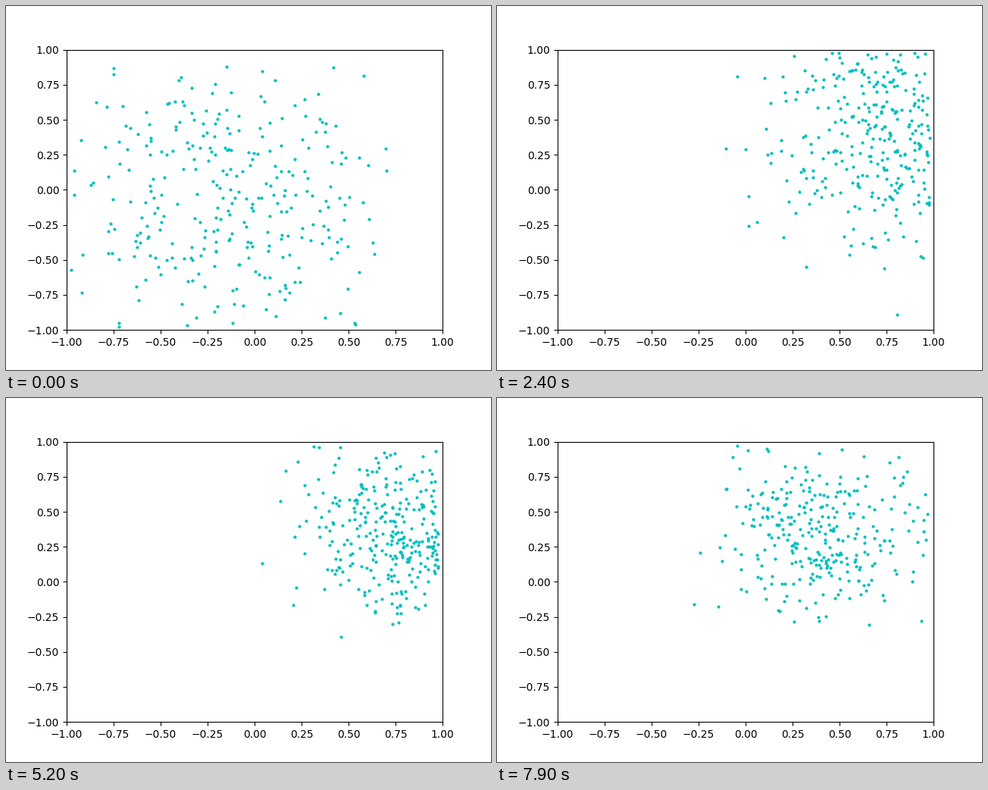
These frames come from a looping animation (640x480 px, 8 s). A matplotlib script:

```python
import matplotlib.pyplot as plt
import numpy as np
from matplotlib.animation import FuncAnimation

FRAMES, STEP, COUNT = 80, 100, 300
WALL = 0.98

# All pairs are (x, y)
CENTRE = np.array([0.57, 0.56])
PERIOD = np.array([37.5, 26.7])
SWAY = np.array([0.24, 0.22])
FIRST_SWAY = np.array([0.45, 0.42])
SPREAD = np.array([0.25, 0.27])
FIRST_SPREAD = np.array([0.12, 0.16])

rng = np.random.default_rng(12)
start = rng.triangular(-2.45, 0, 2.45, size=(COUNT, 2))
swing = rng.normal(size=(COUNT, 2))
rate = rng.normal(0, 0.03, size=(COUNT, 2))


def bounce(p):
    """Reflect positions at the walls of the box."""
    return WALL * (1 - np.abs((p / WALL + 1) % 4 - 2))


def positions(t):
    # The swarm sways around a point near the corner and settles over time
    sway = SWAY + FIRST_SWAY * np.exp(-t / 7)
    centre = CENTRE - sway * np.cos(2 * np.pi * t / PERIOD)
    spread = SPREAD + FIRST_SPREAD * np.exp(-(t / 30) ** 2)
    offset = start * np.cos(rate * t) + swing * np.sin(rate * t)
    return bounce(centre + spread * offset)


fig, ax = plt.subplots(figsize=(6.4, 4.8), dpi=100)
ax.set(xlim=(-1, 1), ylim=(-1, 1))
dots, = ax.plot([], [], "co", ms=2)


def update(frame):
    dots.set_data(*positions(frame).T)
    return dots,


anim = FuncAnimation(fig, update, frames=FRAMES, interval=STEP,
                     repeat=True, repeat_delay=0)
plt.show()
```
